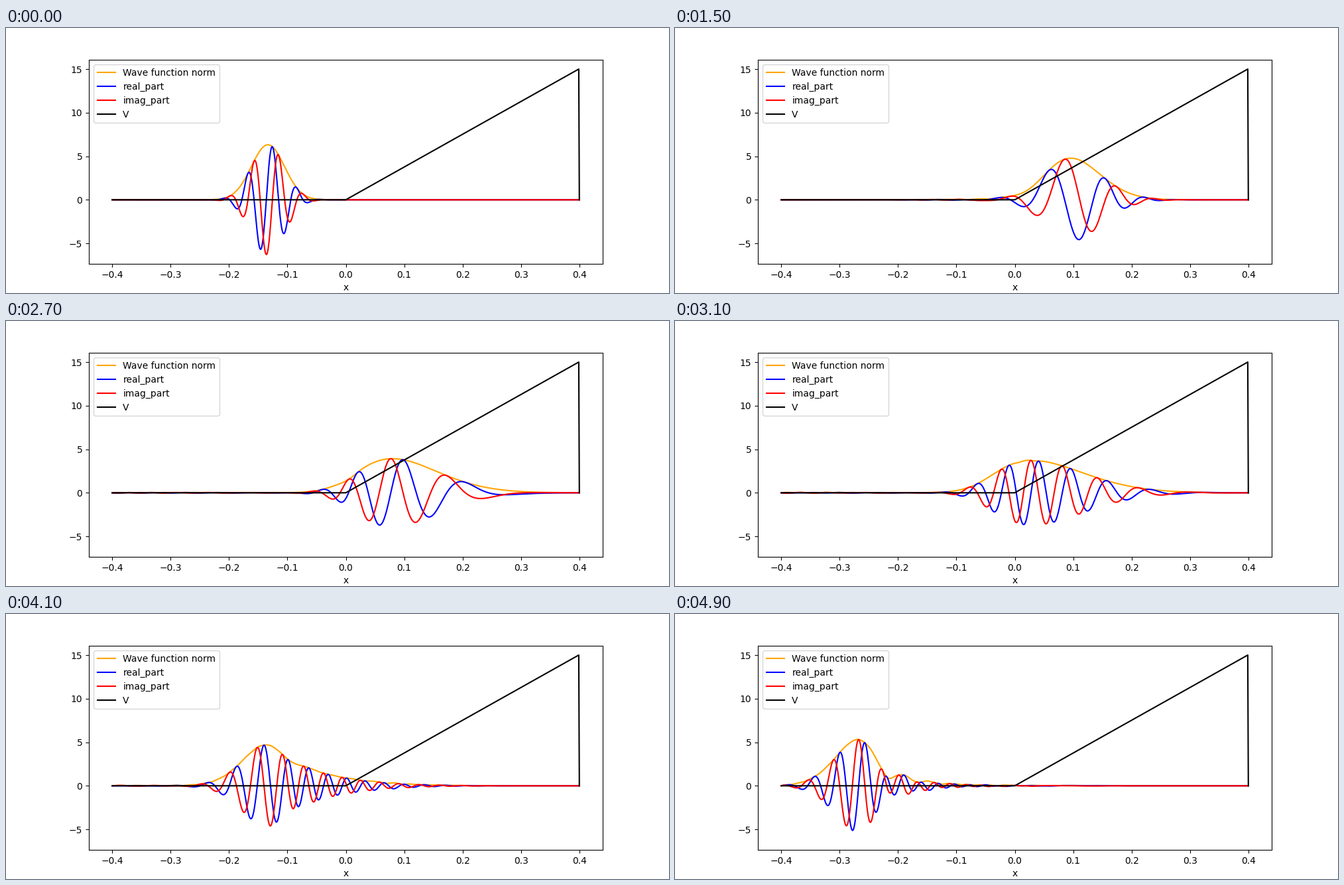
A matplotlib script for the animation above (5000 ms loop, 1000 by 400 pixels).

```python
import numpy as np
import matplotlib.pyplot as plt
from matplotlib.animation import FuncAnimation

# Gaussian wave packet climbing a linear potential ramp (hbar = m = 1)
FRAMES, INTERVAL = 50, 100
HALF, N = 0.4, 801
K0 = 150.0            # mean wave number
X0 = -HALF / 3        # starting centre
SIGMA = 0.02
ENERGY_RATIO = 0.3    # packet energy / ramp height
LOSS = 0.0012         # amplitude damping per frame

x = np.linspace(-HALF, HALF, N)
dx = x[1] - x[0]
times = np.linspace(0, 0.006, FRAMES)

v_max = K0**2 / 2 / ENERGY_RATIO
V = v_max * np.clip(x, 0, None) / HALF
V[-1] = 0

psi0 = (2 / (np.pi * SIGMA**2)) ** 0.25 * np.exp(
    -((x - X0) / (2 * SIGMA)) ** 2 + 1j * K0 * x)


def evolve(psi):
    """Return the state at every time, one column per frame."""
    hop = np.full(N - 1, -0.5 / dx**2)
    H = np.diag(V + 1 / dx**2) + np.diag(hop, 1) + np.diag(hop, -1)
    energy, modes = np.linalg.eigh(H)
    coef = modes.T @ psi
    phase = np.exp(-1j * np.outer(energy, times))
    states = modes @ (coef[:, None] * phase)
    return states * np.exp(-LOSS * np.arange(FRAMES))


states = evolve(psi0)


def parts(n):
    psi = states[:, n]
    return np.abs(psi), psi.real, psi.imag


fig, ax = plt.subplots(figsize=(10, 4), dpi=100)
styles = [("Wave function norm", "orange"), ("real_part", "blue"),
          ("imag_part", "red")]
lines = [ax.plot(x, y, color=color, label=label)[0]
         for y, (label, color) in zip(parts(0), styles)]
ax.plot(x, 15 * V / V.max(), color="black", label="V")
ax.set_xlabel("x")
ax.legend(loc="upper left")
ax.set_ylim(ax.get_ylim())


def update(n):
    for line, y in zip(lines, parts(n)):
        line.set_ydata(y)
    return lines


anim = FuncAnimation(fig, update, frames=FRAMES, interval=INTERVAL,
                     repeat=True, repeat_delay=0)
plt.show()
```
